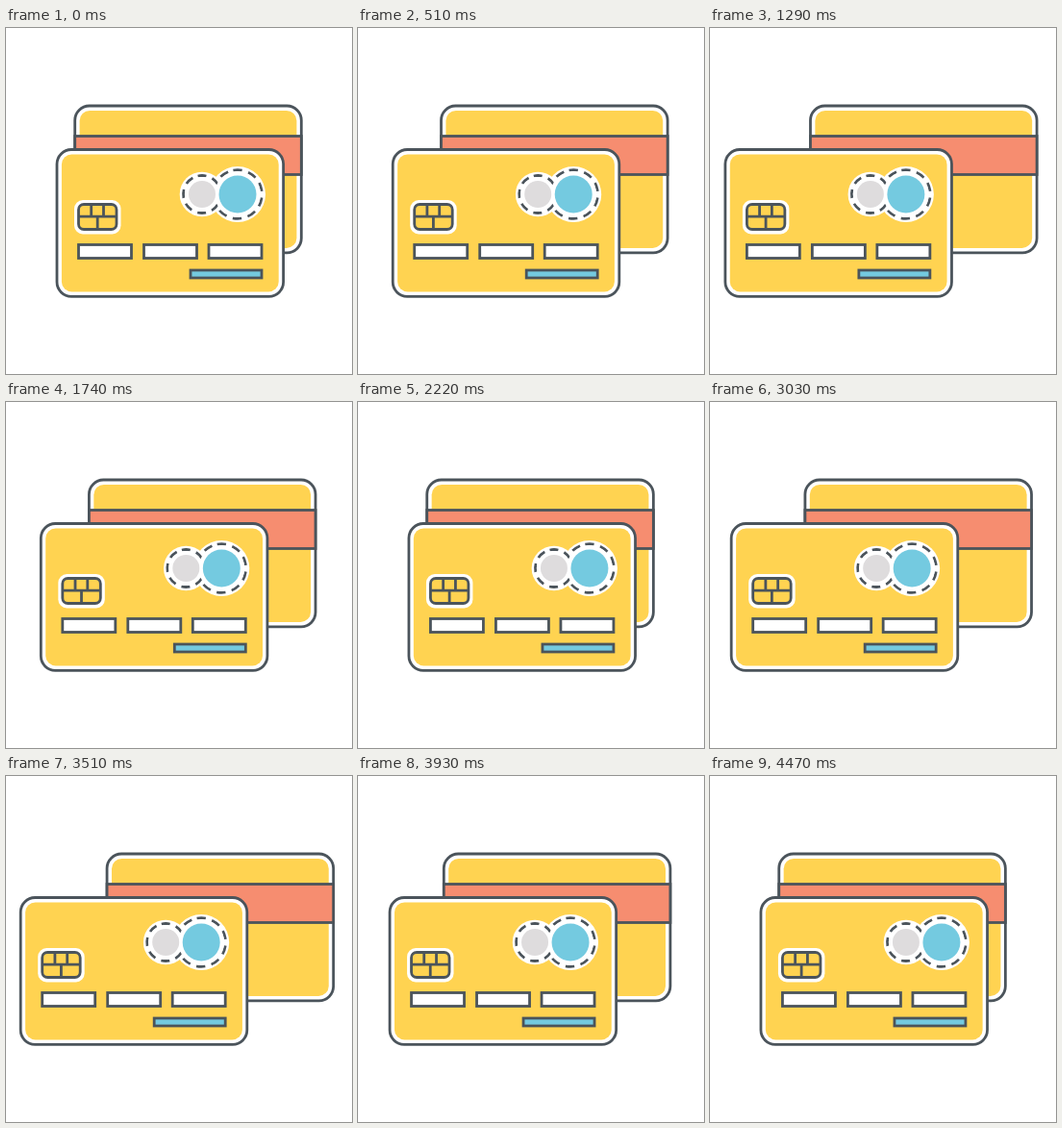
Recreate the animation shown at these times as an HTML page. Size 360 by 360 pixels, loop 4500 ms.

```html
<!DOCTYPE html>
<html lang="en">
<head>
<meta charset="utf-8">
<title>Bank cards</title>
<style>
  html, body { margin: 0; width: 100%; height: 100%; overflow: hidden; background: #fff; }
  svg { display: block; width: 100%; height: 100%; }
  .line { stroke: #4b545b; stroke-width: 2.8; }
  .none { fill: none; }
  .white { fill: #fff; }
  .yellow { fill: #ffd351; }
  .blue { fill: #74cae0; }
  .coral { fill: #f68d70; }
  .gray { fill: #dedcdd; }
</style>
</head>
<body>
<svg viewBox="0 0 360 360">
  <defs>
    <g id="card">
      <rect class="line white" width="235.6" height="152.8" rx="15"/>
      <rect class="yellow" x="4.9" y="4.9" width="225.8" height="143" rx="10.5"/>
    </g>
  </defs>

  <g id="back">
    <use href="#card" x="71.7" y="81"/>
    <rect class="line coral" x="71.7" y="112.5" width="235.6" height="40"/>
  </g>

  <g id="front">
    <use href="#card" x="53" y="126.5"/>

    <!-- The inner white discs hide the dashes where the rings overlap -->
    <circle class="white" cx="204" cy="173" r="23.3"/>
    <circle class="white" cx="241" cy="173" r="29"/>
    <circle class="line none dashed" cx="204" cy="173" r="19.5" data-count="8"/>
    <circle class="line none dashed" cx="241" cy="173" r="25.3" data-count="10"/>
    <circle class="white" cx="204" cy="173" r="18.1"/>
    <circle class="white" cx="241" cy="173" r="23.9"/>
    <circle class="gray" cx="204" cy="173" r="14"/>
    <circle class="blue" cx="241" cy="173" r="19.5"/>

    <rect class="white" x="71" y="179" width="48.5" height="35.5" rx="9"/>
    <rect class="line yellow" x="75.5" y="183.5" width="39.5" height="26" rx="5.5"/>
    <path class="line none" d="M75.5 196.2H115M88.7 183.5v13M101.5 183.5v13M95.2 196.5v13"/>

    <rect class="line white" x="75.5" y="225.5" width="55" height="14"/>
    <rect class="line white" x="143.5" y="225.5" width="55" height="14"/>
    <rect class="line white" x="211" y="225.5" width="55" height="14"/>
    <rect class="line blue" x="192" y="252" width="74" height="8"/>
  </g>
</svg>
<script>
  const PERIOD = 2250;
  const DASH_SHARE = 0.58;
  const front = document.getElementById('front');
  const back = document.getElementById('back');

  // Even dashes, one of them centred at the top of each ring
  for (const ring of document.querySelectorAll('.dashed')) {
    const count = +ring.dataset.count;
    const pitch = 2 * Math.PI * ring.r.baseVal.value / count;
    const dash = pitch * DASH_SHARE;
    ring.setAttribute('stroke-dasharray', `${dash} ${pitch - dash}`);
    ring.setAttribute('transform',
      `rotate(${-90 - 180 * DASH_SHARE / count} ${ring.cx.baseVal.value} ${ring.cy.baseVal.value})`);
  }

  function draw() {
    const swing = 1 - Math.cos(2 * Math.PI * performance.now() / PERIOD);
    front.setAttribute('transform', `translate(${-19.6 * swing} 0)`);
    back.setAttribute('transform', `translate(${17.3 * swing} 0)`);
    requestAnimationFrame(draw);
  }
  draw();
</script>
</body>
</html>
```
